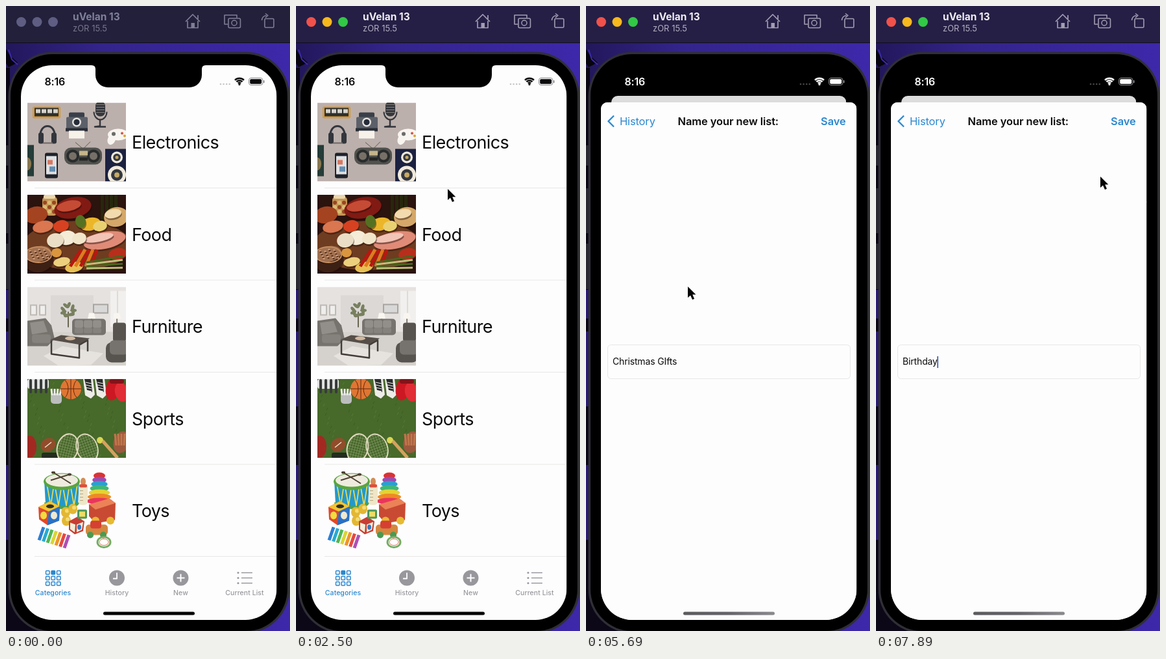
Animation, 438 px wide and 960 px high, one loop 7.99 s. Source, as an HTML page with a canvas:

```html
<!DOCTYPE html>
<html lang="en">
<head>
<meta charset="utf-8">
<title>List app in a phone simulator</title>
<style>
html, body { margin: 0; width: 100%; height: 100%; overflow: hidden; background: #000; }
canvas { display: block; width: 438px; height: 960px; }
</style>
</head>
<body>
<canvas id="stage"></canvas>
<script>
const W = 438, H = 960, LOOP = 7990, STEP = LOOP / 80;
const PAPER = '#fefdfe', INK = '#0b0b0c', BLUE = '#2b88cf', GREY = '#98979c', RULE = '#e8e7e6';
const SCREEN = { x: 23, y: 91, w: 394.5, h: 852 };
const canvas = document.getElementById('stage');
const c = canvas.getContext('2d');
const dpr = window.devicePixelRatio || 1;
canvas.width = W * dpr;
canvas.height = H * dpr;

const clamp = (v, a = 0, b = 1) => Math.min(b, Math.max(a, v));
const easeOut = v => 1 - (1 - clamp(v)) ** 3;
const smooth = v => v * v * (3 - 2 * v);

function box(x, y, w, h, fill, r = 0) {
  c.beginPath();
  c.roundRect(x, y, w, h, r);
  c.fillStyle = fill;
  c.fill();
}
function frame(x, y, w, h, color, r = 0, width = 1) {
  c.beginPath();
  c.roundRect(x, y, w, h, r);
  c.strokeStyle = color;
  c.lineWidth = width;
  c.stroke();
}
function oval(x, y, rx, ry, fill, turn = 0) {
  c.beginPath();
  c.ellipse(x, y, rx, ry, turn, 0, 7);
  c.fillStyle = fill;
  c.fill();
}
function ring(x, y, rx, ry, color, width = 1, turn = 0, from = 0, to = 2 * Math.PI) {
  c.beginPath();
  c.ellipse(x, y, rx, ry, turn, from, to);
  c.strokeStyle = color;
  c.lineWidth = width;
  c.stroke();
}
function trace(p) {
  c.beginPath();
  for (let i = 0; i < p.length; i += 2) c.lineTo(p[i], p[i + 1]);
}
function line(p, color, width = 1) {
  trace(p);
  c.strokeStyle = color;
  c.lineWidth = width;
  c.stroke();
}
function poly(p, fill) {
  trace(p);
  c.fillStyle = fill;
  c.fill();
}
function fade(x0, x1, stops) {
  const g = c.createLinearGradient(x0, 0, x1, 0);
  stops.forEach((color, i) => g.addColorStop(i / (stops.length - 1), color));
  return g;
}
function text(s, x, y, size, color = INK, weight = 400, spacing = 0, align = 'left') {
  c.font = `${weight} ${size}px Inter, sans-serif`;
  c.letterSpacing = spacing + 'px';
  c.textAlign = align;
  c.fillStyle = color;
  c.fillText(s, x, y);
}
function group(draw) {
  c.save();
  draw();
  c.restore();
}

// Category pictures, each 152 by 121
function electronics() {
  box(0, 0, 152, 121, '#bcb0ac');
  box(8, 6, 43, 18, '#d79a3c', 2);
  box(11, 8, 37, 13, '#2d302c');
  for (let i = 0; i < 4; i++) box(13 + i * 9, 10, 7, 6, '#d5d2cc');
  box(64, 15, 24, 8, '#393f49', 2);
  box(60, 22, 33, 18, '#5c6069', 2);
  oval(76, 30, 7, 7, '#e5e2df');
  oval(76, 30, 4.5, 4.5, '#262c38');
  box(59, 39, 34, 5, '#292d36');
  box(64, 43, 24, 12, '#f6f2ea');
  box(105, -2, 15, 23, '#34363c', 7);
  for (let y = 3; y < 17; y += 4) line([106, y, 119, y], '#84807c');
  ring(112.5, 14, 10, 12, '#34363c', 2, 0, 0, Math.PI);
  line([112, 26, 112, 36, 104, 37, 121, 37], '#34363c', 2.5);
  ring(31, 49, 11, 13, '#33363d', 3, 0, Math.PI, 2 * Math.PI);
  box(17, 46, 8, 17, '#33363d', 3);
  box(37, 46, 8, 17, '#33363d', 3);
  line([24, 62, 39, 62], '#6d6866', 2);
  oval(140, 49, 16, 9, '#f8f5f1');
  oval(130, 56, 6, 9, '#f8f5f1', .4);
  oval(133, 48, 3, 3, '#6c6b69');
  oval(146, 47, 2, 2, '#d65245');
  oval(150, 51, 2, 2, '#d5a536');
  line([74, 61, 86, 71, 97, 60], '#5b594d', 1);
  box(57, 69, 58, 26, '#51524e', 10);
  for (const x of [70, 102]) {
    oval(x, 82, 10, 10, '#292c2c');
    oval(x, 82, 6, 6, '#777068');
  }
  box(80, 74, 13, 7, '#c4b58a');
  box(80, 84, 13, 5, '#242624');
  box(27, 77, 20, 39, '#1e222b', 3);
  box(29, 82, 16, 28, '#dfe0e2');
  box(31, 88, 8, 7, '#d67863');
  box(34, 98, 9, 8, '#668eb0');
  box(0, 65, 10, 48, '#253c38');
  oval(0, 94, 6, 10, '#8a7750');
  box(120, 71, 32, 50, '#1b2140');
  for (const [y, r] of [[84, 9], [111, 14]]) {
    oval(138, y, r, r, '#f1eadb');
    oval(138, y, r * .64, r * .64, '#343842');
    oval(138, y, r * .28, r * .28, '#c9aa62');
  }
}

function food() {
  box(0, 0, 152, 121, '#2b130e');
  oval(77, 78, 84, 38, '#6e3c20');
  for (let x = 113; x < 137; x += 7) box(x, 0, 5, 38, '#26270c', 2);
  box(23, 3, 23, 29, '#c69655', 5);
  box(25, 0, 18, 6, '#ead6ac', 2);
  for (let i = 0; i < 9; i++) oval(27 + i % 3 * 7, 12 + (i / 3 | 0) * 7, 3, 3, i % 2 ? '#d8bd72' : '#984620');
  const pieces = [
    [13, 31, 18, 13, '#a44320'], [70, 20, 29, 16, '#811a13'], [64, 17, 19, 8, '#c54b35'],
    [137, 34, 19, 15, '#d5a869'], [132, 29, 13, 7, '#f2dbae'], [97, 45, 16, 10, '#ebb629'],
    [82, 41, 8, 10, '#567021'], [112, 48, 11, 8, '#e9d071'], [24, 49, 16, 9, '#da7650'],
    [52, 48, 12, 9, '#d64121'], [61, 66, 14, 11, '#f5ecd8'], [43, 70, 13, 11, '#eadfc6'],
    [119, 70, 33, 13, '#df8b78'], [110, 66, 23, 6, '#f2c4b6'], [80, 67, 11, 9, '#f2e6ca'],
    [139, 91, 14, 9, '#b82e1c'], [17, 99, 23, 20, '#3d2014'], [17, 91, 20, 12, '#a1704f'],
    [53, 103, 13, 7, '#ecd07d'], [72, 111, 14, 8, '#e7c055'], [45, 89, 8, 7, '#d9963e']
  ];
  for (const [x, y, rx, ry, color] of pieces) {
    oval(x + 1, y + 2.5, rx, ry, '#1d0a0870', -.2);
    oval(x, y, rx, ry, color, -.2);
  }
  for (let i = 0; i < 28; i++) oval(3 + i * 11 % 30, 84 + i * 7 % 15, 1.6, 1.3, i % 2 ? '#d2a07f' : '#57301c');
  for (let i = 0; i < 5; i++) line([66 + i * 8, 110, 83 + i * 6, 84], i % 2 ? '#e17a1d' : '#b9170f', 5);
  for (let i = 0; i < 4; i++) line([91, 104 + i * 3, 147, 94 + i * 6], i % 2 ? '#bec07a' : '#49651d', 3);
  ring(17, 92, 20, 12, '#c48c60', 2);
}

function furniture() {
  box(0, 0, 152, 121, '#e5e2e0');
  box(0, 69, 152, 52, '#d5d1cd');
  box(36, 13, 66, 56, '#dbd8d6');
  for (const x of [4, 18]) {
    box(x, 27, 11, 17, '#bdb9b5');
    box(x + 2, 29, 7, 13, '#f0eeec');
  }
  box(101, 26, 24, 15, '#a8a4a1');
  box(103, 28, 20, 11, '#d8d8d8');
  box(128, 6, 24, 55, '#f2f0ee');
  line([139, 6, 139, 61], '#c8c5c1');
  line([63, 62, 63, 38], '#6a6650', 2);
  for (let i = 0; i < 10; i++) oval(63 + Math.cos(i * 2.4) * 8, 36 + Math.sin(i * 2.4) * 8, 5, 2.5, '#78805f', i);
  for (const x of [99, 138]) {
    poly([x - 4, 40, x + 4, 40, x + 6, 49, x - 6, 49], '#f9f6f0');
    line([x, 49, x, 58], '#858078', 2);
  }
  const sofa = '#76726d', light = '#928e89', dark = '#575450';
  box(69, 49, 52, 25, sofa, 5);
  for (let x = 73; x < 113; x += 14) {
    box(x, 51, 13, 12, light, 3);
    box(x, 63, 13, 8, '#85817c', 2);
  }
  poly([0, 52, 28, 48, 37, 59, 42, 80, 31, 91, 0, 91], sofa);
  poly([4, 55, 25, 52, 31, 69, 7, 73], light);
  box(7, 73, 29, 13, '#85817c', 4);
  box(132, 55, 20, 29, dark, 4);
  box(121, 85, 34, 31, dark, 9);
  box(127, 82, 28, 22, sofa, 6);
  poly([25, 106, 54, 91, 117, 102, 98, 120, 48, 121], '#e6e3de');
  poly([35, 81, 52, 74, 96, 79, 83, 89], '#564e48');
  line([37, 82, 37, 103, 80, 109, 80, 89, 93, 82, 93, 99], '#423d39', 2.5);
  oval(66, 79, 8, 3, '#d0b8a0');
}

function sports() {
  box(0, 0, 152, 121, '#47692a');
  for (let i = 0; i < 80; i++) {
    const x = i * 47 % 152, y = i * 29 % 121;
    line([x, y, x + 2, y - 4], i % 2 ? '#577a36' : '#3c5d22');
  }
  box(0, 0, 33, 15, '#dfe0df', 4);
  for (let x = 3; x < 32; x += 8) box(x, 0, 4, 22, '#373c3a', 2);
  box(36, 22, 17, 16, '#bcbebe', 5);
  for (let i = 0; i < 4; i++) line([38 + i * 4, 25, 37 + i * 5, 15], '#ebebe8', 3);
  oval(67, 15, 16, 16, '#e07633');
  line([51, 15, 83, 15], '#602911');
  line([67, -1, 67, 31], '#602911');
  ring(52, 15, 11, 16, '#602911', 1, 0, -1, 1);
  ring(82, 15, 11, 16, '#602911', 1, 0, 2.1, 4.2);
  for (const x of [86, 104]) {
    poly([x, 0, x + 15, 0, x + 18, 24, x + 12, 30, x + 3, 25], '#eeece8');
    poly([x + 2, 0, x + 12, 0, x + 14, 20, x + 6, 17], '#292d2c');
    for (let y = 5; y < 18; y += 4) line([x + 4, y, x + 13, y + 2], '#f6f4ef');
  }
  oval(132, 15, 11, 18, '#cb1822', .2);
  oval(145, 20, 10, 15, '#e12d35', -.2);
  box(127, 0, 22, 7, '#84131a', 3);
  oval(4, 104, 10, 17, '#a22922');
  oval(32, 101, 12, 10, '#914d2b', -.5);
  line([27, 105, 37, 97], '#f3e7d0', 1.5);
  box(22, 113, 25, 9, '#242c20', 3);
  for (const [x, turn] of [[62, .25], [92, -.35]]) group(() => {
    c.translate(x, 106);
    c.rotate(turn);
    c.beginPath();
    c.ellipse(0, 0, 16, 22, 0, 0, 7);
    c.save();
    c.clip();
    for (let i = -20; i < 22; i += 4) {
      line([i, -23, i, 23], '#bfc3a370', .7);
      line([-18, i, 18, i], '#bfc3a370', .7);
    }
    c.restore();
    ring(0, 0, 16, 22, '#ddd8ba', 2);
  });
  oval(112, 94, 5, 5, '#d9d653');
  line([116, 95, 139, 121], '#d4a15f', 5);
  oval(145, 97, 12, 17, '#9d593d', .3);
  for (let i = 0; i < 4; i++) line([137 + i * 4, 102, 135 + i * 5, 84], '#bf774b', 3);
}

function toys() {
  poly([26, 15, 80, 15, 78, 51, 65, 58, 39, 58, 28, 50], '#2299cd');
  for (let x = 30; x < 77; x += 12) line([x, 20, x + 6, 53, x + 11, 20], '#e8db55', 1.7);
  ring(53, 48, 25, 8, '#4fa33d', 4, 0, 0, Math.PI);
  oval(53, 16, 28, 13, '#59a53f');
  oval(53, 14, 25, 10, '#efebdf');
  line([40, 2, 67, 19], '#4d4132', 2);
  line([65, 5, 36, 14], '#4d4132', 2);
  oval(40, 2, 3, 2, '#4d4132');
  oval(65, 5, 3, 2, '#4d4132');
  const rings = ['#dd3232', '#9d4bb1', '#2c9fd0', '#40b879', '#e5d334', '#ee8b24', '#ea355f'];
  rings.forEach((color, i) => oval(111, 7 + i * 6.5, 9 + i * 1.8, 5, color));
  box(79, 20, 14, 32, '#efe6c8', 5);
  oval(86, 16, 4, 6, '#d48d55');
  box(80, 20, 12, 5, '#dd4e39', 2);
  for (let y = 30; y < 48; y += 5) line([81, y, 86, y], '#b8a67d');
  poly([95, 51, 126, 42, 136, 49, 135, 75, 105, 80, 95, 69], '#c84a32');
  poly([95, 51, 126, 42, 136, 49, 105, 59], '#ec8257');
  for (const x of [105, 128]) oval(x, 76, 6, 6, '#e6bb34');
  poly([17, 55, 35, 46, 50, 54, 49, 76, 31, 83, 18, 74], '#e0482d');
  poly([17, 55, 35, 46, 50, 54, 33, 62], '#f2c52e');
  poly([33, 62, 50, 54, 49, 76, 31, 83], '#2872c7');
  oval(25, 68, 5, 6, '#f4dc41');
  oval(41, 68, 5, 6, '#f0e8cf');
  oval(35, 54, 6, 3, '#2b302c');
  for (const [x, y] of [[59, 63], [70, 58], [60, 76]]) {
    oval(x, y, 7, 8, '#e3b735');
    oval(x + 2, y - 2, 3, 3, '#f3dd72');
  }
  poly([64, 77, 77, 70, 88, 77, 86, 92, 73, 97, 64, 90], '#c83d34');
  poly([66, 79, 74, 82, 73, 94, 66, 89], '#f3edd8');
  poly([76, 82, 86, 78, 84, 90, 76, 94], '#f3edd8');
  oval(80, 86, 3, 4, '#347ac1');
  box(77, 59, 15, 14, '#4f9858', 2);
  box(80, 62, 9, 8, '#f0dc64');
  const bars = ['#2d7ed4', '#27abd0', '#51b653', '#d9d532', '#ef9428', '#e54842', '#ae4fb5'];
  bars.forEach((color, i) => line([25 + i * 6.5, 86 + i * 2, 18 + i * 6.5, 106 + i * 2], color, 5));
  box(90, 82, 34, 16, '#d4873f', 5);
  box(97, 76, 17, 12, '#d64032', 4);
  for (const x of [97, 117]) oval(x, 98, 5, 5, '#4b9951');
  ring(118, 109, 10, 8, '#75ad63', 3);
  ring(118, 109, 7, 5, '#e06c55', 1);
}

const CATEGORIES = [
  ['Electronics', electronics], ['Food', food], ['Furniture', furniture], ['Sports', sports], ['Toys', toys]
];

function categoryPage() {
  CATEGORIES.forEach(([name, picture], i) => {
    const y = 148.5 + i * 141.5;
    group(() => {
      c.translate(33, y);
      c.beginPath();
      c.rect(0, 0, 152, 121);
      c.clip();
      picture();
    });
    text(name, 194, y + 70.5, 27, INK, 400, -.6);
    line([44, y + 131, 417, y + 131], RULE);
  });
}

function field(x, y, value, caret) {
  frame(x + .5, y + .5, 374, 52, RULE, 5);
  text(value, x + 8, y + 31, 14, INK, 400, -.15);
  const end = value ? c.measureText(value).width : 0;
  if (caret) box(x + 7.5 + end, y + 18, 1.8, 18, '#3f62b8');
}

function tabs(active) {
  ['Categories', 'History', 'New', 'Current List'].forEach((name, i) => {
    const x = 72.5 + i * 98.5, y = 878.5, color = i === active ? BLUE : GREY;
    if (i === 0) {
      for (let n = 0; n < 9; n++) {
        const gx = x - 11 + n % 3 * 8.5, gy = y - 11 + (n / 3 | 0) * 8.5;
        frame(gx, gy, 5.5, 5.5, color, 1, 1.5);
        if (n === 1) box(gx, gy, 5.5, 5.5, color);
      }
    } else if (i === 3) {
      for (let n = -1; n < 2; n++) {
        oval(x - 10, y + n * 8, 1.5, 1.5, color);
        line([x - 5, y + n * 8, x + 12, y + n * 8], color, 1.7);
      }
    } else {
      oval(x, y, 12, 12, color);
      if (i === 1) line([x, y - 8, x, y + 1, x - 6, y + 1], PAPER, 1.8);
      else {
        line([x - 6, y, x + 6, y], PAPER, 2);
        line([x, y - 6, x, y + 6], PAPER, 2);
      }
    }
    text(name, x, 905, 10.5, color, 500, .05, 'center');
  });
}

function mainPage(t) {
  const onNew = t >= 1100 && t < 2000;
  box(SCREEN.x, SCREEN.y, SCREEN.w, SCREEN.h, PAPER);
  if (onNew) {
    text('Save', 362, 166.5, 16.5, BLUE, 600, -.1);
    field(33, 491, '', true);
  } else categoryPage();
  tabs(onNew ? 2 : 0);
}

function typed(t) {
  if (t < 6576) return 'Christmas GIfts'.slice(0, clamp(Math.floor((t - 3900) / 100), 0, 15));
  return 'Birthday'.slice(0, clamp(Math.floor((t - 7020) / 100), 0, 8));
}

// Share of the form page that is still off to the right
function pageShift(t) {
  if (t < 6050) return 1 - easeOut((t - 3020) / 500);
  if (t < 6576) return easeOut((t - 6050) / 450);
  return 1 - easeOut((t - 6576) / 500);
}

function sheet(t, rise) {
  const shift = pageShift(t), off = shift * 394;
  c.translate(0, (1 - rise) * 812);
  c.beginPath();
  c.roundRect(SCREEN.x, 148, SCREEN.w, 812, [10, 10, 0, 0]);
  c.clip();
  box(SCREEN.x, 148, SCREEN.w, 812, PAPER);
  group(() => {
    c.translate(-118 * (1 - shift), 0);
    c.globalAlpha = shift;
    text('History', 39, 240, 33, INK, 700, -.5);
    c.globalAlpha = 1;
    if (t > 6000) {
      text('Christmas GIfts', 39, 286.5, 17, INK, 400, -.2);
      line([39, 301, 560, 301], '#d4d3d3');
    }
  });
  box(SCREEN.x, 148, off, 812, `rgba(0,0,0,${.1 * (1 - shift)})`);
  box(SCREEN.x + off, 148, SCREEN.w, 812, PAPER);
  box(SCREEN.x, 148, off, 56, PAPER);
  field(33 + off, 520, typed(t), t < 5500 || t > 6500);
  c.globalAlpha = clamp(1 - off / 250);
  const slide = Math.max(0, off - 6);
  c.lineJoin = 'miter';
  line([43 + slide * .2, 168.5, 34.5 + slide * .2, 177, 43 + slide * .2, 185.5], BLUE, 2.3);
  text('History', 52 + off * .02, 183 + slide * .14, 16.5, BLUE, 400, -.15);
  text('Name your new list:', 141.5 + slide * .62, 183, 16.5, INK, 600, -.1);
  text('Save', 362, 183, 16.5, BLUE, 600, -.1);
  c.globalAlpha = clamp((shift - .4) / .6);
  line([383, 177, 399, 177], BLUE, 2);
  line([391, 169, 391, 185], BLUE, 2);
  c.globalAlpha = 1;
}

function statusBar(color) {
  text('8:16', 59.5, 121.5, 16, color, 600, -.2);
  for (let i = 0; i < 4; i++) oval(331 + i * 4.6, 120, 1.3, 1.3, '#8f8e9480');
  for (const r of [3, 6.5, 10]) ring(360, 121, r, r, color, 2.4, 0, -2.35, -.79);
  oval(360, 120.5, 1.6, 1.6, color);
  frame(374.5, 110.5, 21.5, 11, '#8c8b90', 3.5);
  box(376.2, 112.2, 18, 7.6, color, 2);
  box(397, 114, 1.6, 4.4, '#8c8b90', 1);
}

function titleBar(active) {
  box(0, 0, W, 56, active ? '#251f45' : '#22203a');
  box(0, 56, W, 1, '#100d20');
  ['#f0524b', '#f6b81c', '#32c946'].forEach((color, i) => oval(23.5 + i * 24.5, 24.5, 7.5, 7.5, active ? color : '#5f5d82'));
  text('uVelan 13', 103, 22, 15.5, active ? '#f0edf4' : '#81809a', 700);
  text('zOR 15.5', 103, 39, 13, active ? '#b2adc0' : '#77758d', 400);
  const tint = active ? '#a29db2' : '#807d96';
  c.lineJoin = 'round';
  line([277, 24, 288, 13, 299, 24], tint, 1.7);
  line([280, 23, 280, 33.5, 296, 33.5, 296, 23], tint, 1.7);
  line([296, 20, 296, 14], tint, 1.7);
  box(285.5, 26, 5.5, 8, tint);
  line([342, 28, 337, 28, 337, 14, 356, 14, 356, 18], tint, 1.6);
  frame(343, 19, 18.5, 14.5, tint, 2, 1.6);
  ring(352, 26, 4, 4, tint, 1.5);
  frame(399, 19.5, 14, 13.5, tint, 1.5, 1.6);
  ring(402, 22, 7.5, 7.5, tint, 1.5, 0, Math.PI, 4.7);
  line([400, 11.5, 404, 14.5, 400, 18], tint, 1.5);
}

function backdrop() {
  box(0, 0, W, H, fade(0, W, ['#22175a', '#33248a', '#38269a', '#3d28aa']));
  box(0, 95, 6, 865, '#0b0614');
  for (const [y, h] of [[436, 44], [500, 115], [705, 115]]) box(0, y, 4, h, '#2a1a76');
  poly([0, 66, 6, 76, 18, 87, 4, 94, 0, 88], '#08040e');
  line([4, 67, 9, 82, 18, 90], '#3b2ab0', 2);
  box(0, 900, 60, 60, '#0c0818');
  for (const [y, h] of [[214, 31], [280, 69], [365, 70]]) box(0, y, 4, h, '#2a2932');
}

function notch() {
  c.beginPath();
  c.moveTo(132, 90);
  c.lineTo(132, 91);
  c.quadraticCurveTo(138, 91, 138, 97);
  c.lineTo(138, 106);
  c.arcTo(138, 125, 157, 125, 19);
  c.lineTo(283, 125);
  c.arcTo(302, 125, 302, 106, 19);
  c.lineTo(302, 97);
  c.quadraticCurveTo(302, 91, 308, 91);
  c.lineTo(308, 90);
  c.fillStyle = '#000';
  c.fill();
}

function arrow(x, y) {
  group(() => {
    c.translate(x, y);
    const shape = [0, 0, 0, 17, 4, 13.5, 7, 20, 10, 18.8, 7.2, 12.3, 12.3, 12.3];
    trace(shape);
    c.closePath();
    c.strokeStyle = '#fcfcfc';
    c.lineWidth = 2;
    c.stroke();
    poly(shape, '#050506');
  });
}

const PATH = [
  [200, 445, 600], [900, 270, 887], [1480, 270, 887], [1920, 74, 880], [2050, 74, 880],
  [2498, 234, 281], [2680, 251, 310], [5350, 251, 310], [5690, 157, 431], [5990, 374, 178],
  [6750, 374, 178], [6890, 371, 193], [7190, 346, 262], [7990, 346, 262]
];
function pointer(t) {
  const i = PATH.findIndex(p => p[0] > t);
  if (i < 1) return;
  const [t0, x0, y0] = PATH[i - 1], [t1, x1, y1] = PATH[i];
  const k = smooth((t - t0) / (t1 - t0));
  arrow(x0 + (x1 - x0) * k, y0 + (y1 - y0) * k);
}

function draw(t) {
  c.setTransform(dpr, 0, 0, dpr, 0, 0);
  backdrop();
  titleBar(t >= 900);
  box(3.5, 70.5, 434, 893, '#302f36', 68);
  box(7, 74, 427, 886, '#000', 64);

  const rise = easeOut((t - 2680) / 480);
  group(() => {
    c.beginPath();
    c.roundRect(SCREEN.x, SCREEN.y, SCREEN.w, SCREEN.h, 48);
    c.clip();
    group(() => {
      const scale = 1 - .081 * rise;
      c.translate(220, 91 + 47 * rise);
      c.scale(scale, scale);
      c.translate(-220, -91);
      if (rise) {
        c.beginPath();
        c.roundRect(SCREEN.x, SCREEN.y, SCREEN.w, SCREEN.h, 11);
        c.clip();
      }
      mainPage(t);
      if (rise) box(SCREEN.x, SCREEN.y, SCREEN.w, SCREEN.h, `rgba(0,0,0,${.13 * rise})`);
    });
    if (rise) group(() => sheet(t, rise));
  });
  notch();
  statusBar(rise > .5 ? '#fdfdfd' : INK);
  box(150, 930.5, 141, 5, rise > .5 ? fade(150, 291, ['#5b5a5d', '#656468', '#8b8a8d']) : '#050506', 2.5);
  pointer(t);
}

const start = performance.now();
function tick() {
  const time = Math.max(0, performance.now() - start) % LOOP;
  draw(Math.min(79, Math.floor((time + 10) / STEP)) * STEP);
  requestAnimationFrame(tick);
}
tick();
</script>
</body>
</html>
```
